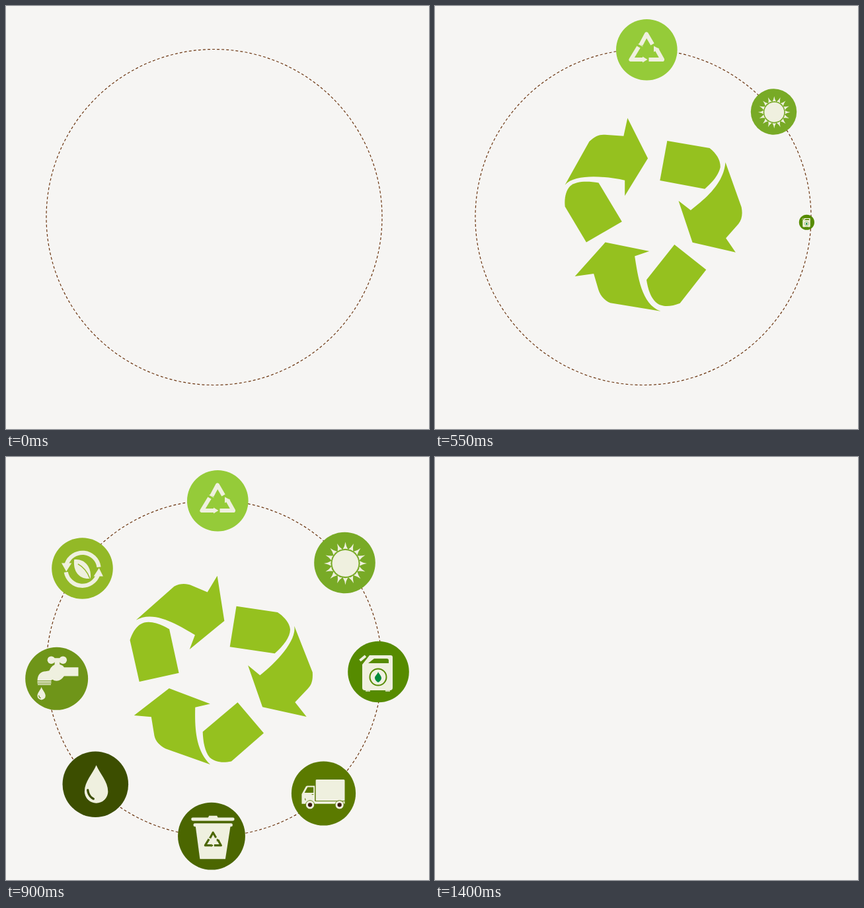
Animation of 640 by 640 pixels, one loop 1.45 s. Source, as an HTML page:

```html
<!DOCTYPE html>
<html lang="en">
<head>
<meta charset="utf-8">
<title>Recycling loop</title>
<style>
  html, body { margin: 0; width: 100%; height: 100%; overflow: hidden; background: #f6f5f3; }
  svg { display: block; width: 100vw; height: 100vh; }
  .cream { fill: #eff0df; }
  .line { fill: none; stroke: #eff0df; }
</style>
</head>
<body>
<svg viewBox="0 0 640 640">
  <defs>
    <!-- small three-arrow triangle, centred on 0,0 -->
    <g id="tri">
      <path d="M-8.5-7.5 0-23.5 9-8M-12-4-23.5 15H-6M3.5 15H24L15-1" fill="none" stroke="currentColor"
        stroke-width="6.2" stroke-linejoin="round"/>
      <path d="M-6 10.5 1.5 15-6 19.5zM11-5.5 19.5-1 11 3.5zM-13-8.5-5-4-10-9.5z" fill="currentColor"/>
    </g>
  </defs>

  <g id="scene">
    <circle id="ring" cx="315" cy="319.5" r="254" fill="none" stroke="#6b3510" stroke-width="1.2"
      pathLength="225" stroke-dasharray=".56 .44"/>

    <g id="sign" fill="#95c11f">
      <path d="M215 262 243 204C252 198 262 194 270 195C284 196 294 212 300 228L270 289z"/>
      <path d="M269 186 346 182C357 184 364 191 368 198L380 220 407 210 373 270 305 271 325 259C314 231 300 190 269 186z"/>
      <path d="M355 306 401 264 444 310C448 322 448 334 443 342C436 351 420 355 402 356z"/>
      <path d="M451 342 429 414C422 424 416 428 408 429L380 433V461L337 408 359 345 364 368C395 368 440 362 451 342z"/>
      <path d="M243 381 312 379 314 440 249 443C237 437 229 429 227 418C227 406 234 393 243 381z"/>
      <path d="M177 297 244 298 278 355 257 345C237 369 217 396 221 427L183 366C179 357 178 348 182 340L196 315z"/>
    </g>

    <g class="icon" data-at="320 66.3">
      <circle cx="320.3" cy="66.3" r="46.3" fill="#95cb39"/>
      <use href="#tri" x="320" y="66" color="#eff0df"/>
    </g>

    <g class="icon" data-at="512.5 160">
      <circle cx="512.5" cy="160" r="46.3" fill="#78aa26"/>
      <circle class="cream" cx="513.5" cy="161" r="20"/>
      <g id="rays" class="cream" transform="translate(513.5 161)"></g>
    </g>

    <g class="icon" data-at="562 328">
      <circle cx="563.5" cy="325" r="46.3" fill="#568b00"/>
      <path class="cream" d="M539 314 550 300H582Q585 300 585 303V349Q585 353 581 353H543Q539 353 539 349z"/>
      <path class="line" d="M535.5 308 544 301" stroke-width="4"/>
      <path class="line" d="M544 354H551M574 354H581" stroke-width="1.5"/>
      <path d="M548 312 557 305H576Q579 305 579 308V312z" fill="#568b00"/>
      <circle cx="563" cy="333" r="12.5" fill="none" stroke="#568b00" stroke-width="2"/>
      <path d="M563 325C565 329 568 331 568 335Q567 339 563 341Q558 338 558 334C558 331 562 329 563 325z" fill="#008a3c"/>
    </g>

    <g class="icon" data-at="480.5 509">
      <circle cx="480.5" cy="509" r="46.3" fill="#5b7a00"/>
      <rect class="cream" x="469" y="489" width="42" height="31" rx="1.5"/>
      <path class="cream" d="M449 523V510L455 499Q456 498 457 498H468V520H511V524H449z"/>
      <path d="M453 508 457.5 500H466V508z" fill="#5b7a00"/>
      <path d="M468.5 490V520H511M463.5 510.5H466M454 516V518.5H455" fill="none" stroke="#5b7a00" stroke-width=".9"/>
      <g fill="#3d1c10" stroke="#eff0df" stroke-width="3">
        <circle cx="461" cy="525.5" r="4.5"/><circle cx="503.5" cy="525.5" r="4.5"/>
      </g>
      <g fill="none" stroke="#5b7a00" stroke-width=".8">
        <circle cx="461" cy="525.5" r="6.4"/><circle cx="503.5" cy="525.5" r="6.4"/>
      </g>
    </g>

    <g class="icon" data-at="311 573.6">
      <circle cx="311" cy="573.6" r="46.3" fill="#4b6600"/>
      <g class="cream">
        <path d="M306 549 307.5 545.5H318.5L320 549z"/>
        <rect x="283" y="548" width="59.5" height="4.5" rx="2.2"/>
        <rect x="286" y="556" width="54" height="4.5" rx="2"/>
        <path d="M289 560H337L330 605H295z"/>
      </g>
      <use href="#tri" transform="translate(313 579.5) scale(.46)" color="#4b6600"/>
    </g>

    <g class="icon" data-at="128 493">
      <circle cx="134.8" cy="495" r="46.3" fill="#3c4e00"/>
      <path class="cream" d="M136 468C141 480 152.5 491 152.5 505A16.5 16.5 0 0 1 119.5 505C119.5 491 131 480 136 468z"/>
      <path d="M124 503Q125 512 132 515.5" fill="none" stroke="#3c4e00" stroke-width="3" stroke-linecap="round"/>
    </g>

    <g class="icon" data-at="49 331">
      <circle cx="76" cy="335.2" r="46.3" fill="#6f9519"/>
      <g class="cream">
        <circle cx="68" cy="307.8" r="5.7"/><circle cx="85.3" cy="307.8" r="5.7"/>
        <path d="M68 305H85V311H80.5V317H73V311H68z"/>
        <path d="M47.5 338Q48 325 60 324.5L65 323.5Q69 314 77 314Q84 314 87 318.5H108V331.5H87Q82 338.5 76 338.5Q72 338.5 70 336.5Q68 336.5 68 338z"/>
        <path d="M53.5 347.5C55 352 59.5 356 59.5 360.5A6 6 0 0 1 47.5 360.5C47.5 356 52 352 53.5 347.5z"/>
      </g>
      <path class="line" d="M47.5 339.8H68M47.5 341.9H68M48 344H67.5" stroke-width="1.3"/>
      <path d="M49.5 360Q50 363 52.5 364" fill="none" stroke="#6f9519" stroke-width="1.2"/>
    </g>

    <g class="icon" data-at="115.5 168.5">
      <circle cx="115.5" cy="168.5" r="46.3" fill="#93b927"/>
      <g transform="translate(115.5 168.5) scale(.953)">
        <path class="line" d="M-25-7A26.5 26.5 0 0 1 26.3-2M-26 6A26.5 26.5 0 0 0 25 10" stroke-width="6.5"/>
        <path class="cream" d="M-33-8.5H-17L-25.5 5zM18 12.5H33L26.5-.5z"/>
        <path class="cream" d="M-13-14C2-16 15-4 13 16C-4 18-15 6-13-14z"/>
        <path d="M-7-7Q6 0 12 16" fill="none" stroke="#93b927" stroke-width="1.5"/>
      </g>
    </g>
  </g>
</svg>
<script>
  const LOOP = 1450;
  const $ = id => document.getElementById(id);
  const scene = $('scene'), ring = $('ring'), sign = $('sign');
  const icons = [...document.querySelectorAll('.icon')].map(el => ({
    el, at: el.dataset.at.split(' ').map(Number)
  }));

  $('rays').innerHTML = Array.from({ length: 16 }, (_, i) =>
    `<path d="M-3.8-21.5Q0-23 3.8-21.5Q1-26 0-32.5Q-1-26-3.8-21.5z" transform="rotate(${i * 22.5})"/>`).join('');

  const clamp = x => Math.min(1, Math.max(0, x));
  const ease = x => (1 - Math.cos(Math.PI * clamp(x))) / 2;
  const about = ([x, y], s, turn = 0) =>
    `translate(${x} ${y}) rotate(${turn}) scale(${s}) translate(${-x} ${-y})`;

  // grow in, swell by a tenth, settle
  const pop = t => ease(t / 150) + 0.1 * (ease((t - 150) / 150) - ease((t - 300) / 100));

  function draw(t) {
    ring.setAttribute('transform', about([315, 319.5], 1, 0.53 + 30 * t / LOOP));

    const turn = 201 * Math.sin(0.00217 * (Math.min(t, 1209) - 485)) - 196;
    const size = 0.57 + 0.43 * ease(t / 520);
    sign.setAttribute('transform', about([320, 320], size, turn));
    sign.setAttribute('opacity', ease(t / 555));

    icons.forEach(({ el, at }, i) => {
      const s = pop(t - 400 - 50 * i);
      el.setAttribute('visibility', s > 0 ? 'visible' : 'hidden');
      el.setAttribute('transform', about(at, s));
    });

    scene.setAttribute('opacity', 1 - clamp((t - 1100) / 300));
  }

  let start;
  function tick(now) {
    start ??= now;
    draw((now - start) % LOOP);
    requestAnimationFrame(tick);
  }
  draw(0);
  requestAnimationFrame(tick);
</script>
</body>
</html>
```
